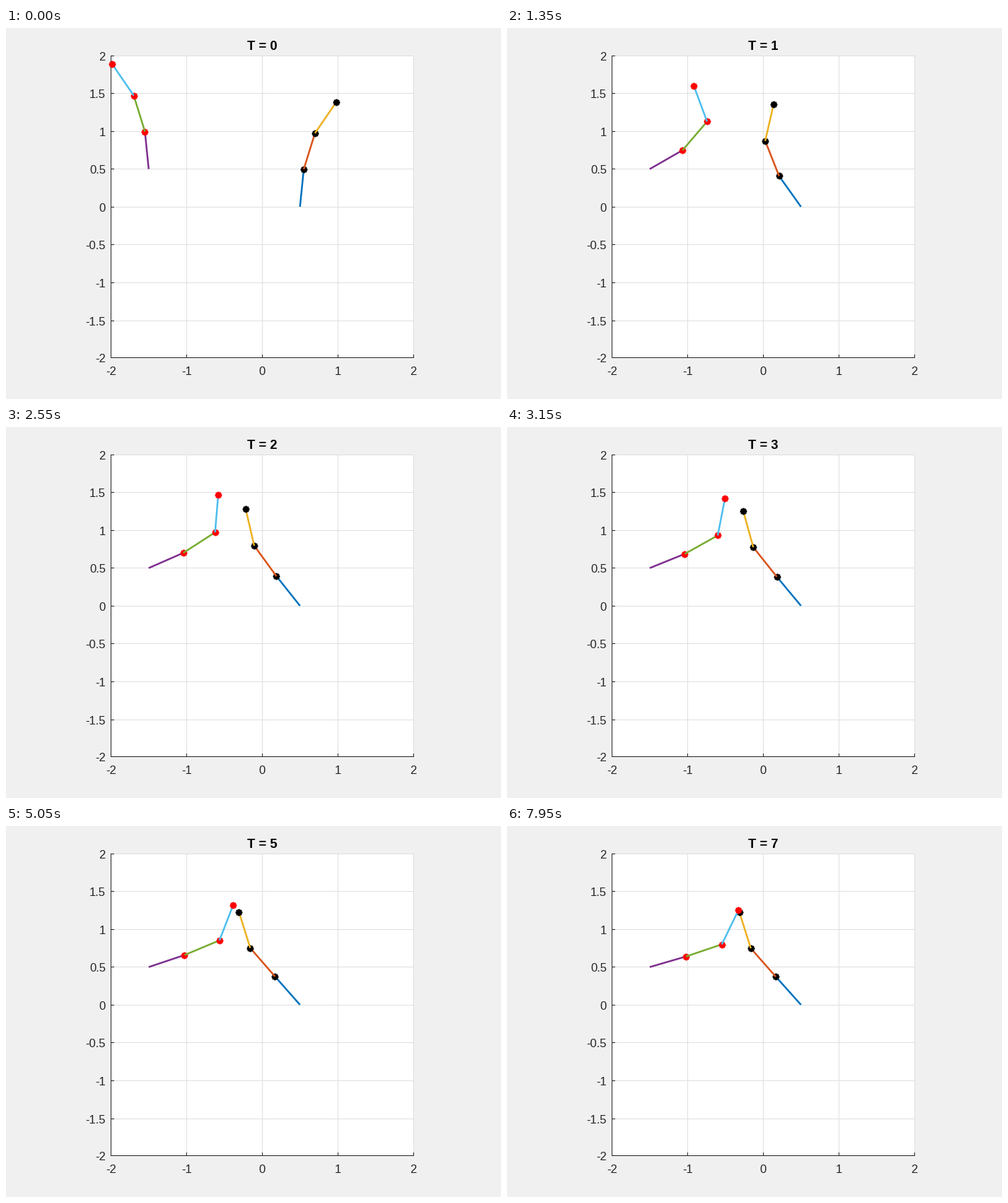
Animation, 700 px wide and 525 px high, one loop 8000 ms. Source, as a matplotlib script:

```python
import numpy as np
import matplotlib.pyplot as plt
from matplotlib.animation import FuncAnimation

W, H, DPI = 700, 525, 100
FRAMES, STEP = 160, 50
PX = 72 / DPI                       # points per pixel

LEFT, RIGHT, TOP, BOTTOM = 148.3, 576.2, 39.5, 466.5
LINK = 0.5
INK, GRID = "#262626", "#dfdfdf"
FONT = "Liberation Sans"
LEAN = np.cumsum([0.1, 0.2, 0.3])   # starting link angles from the vertical

# Per link: final angle, then size and rate of the slow decay,
# rate of the fast decay, and strength of the early swing.
ARMS = [
    dict(base=(0.5, 0), side=-1, marker="black",
         colors=("#0072bd", "#d95319", "#edb120"),
         links=[(0.73, 0.46, 0.8, 4.5, -12.15),
                (0.722, 1.167, 1.0, 3.5, 2.32),
                (0.305, 1.5, 1.2, 4.0, 28.9)]),
    dict(base=(-1.5, 0.5), side=1, marker="red",
         colors=("#7e2f8e", "#77ac30", "#4dbeee"),
         links=[(-1.31, 0.375, 0.35, 4.1, 0),
                (-1.28, 0.693, 0.37, 2.45, 0),
                (-0.475, 1.45, 0.52, 3.5, 7.37)]),
]


def to_px(x, y):
    return (LEFT + (x + 2) / 4 * (RIGHT - LEFT),
            BOTTOM - (y + 2) / 4 * (BOTTOM - TOP))


def angles(arm, t):
    """Settle from rest at the starting lean to the final angles."""
    end, slow, rate, fast, swing = np.array(arm["links"]).T
    rest = LEAN - arm["side"] * end - slow
    drift = rate * slow + fast * rest          # makes the start speed zero
    gap = (slow * np.exp(-rate * t)
           + (rest + drift * t + swing * t**2) * np.exp(-fast * t))
    return end + arm["side"] * gap


def joints(arm, t):
    q = angles(arm, t)
    x = arm["base"][0] - LINK * np.cumsum(np.r_[0, np.sin(q)])
    y = arm["base"][1] + LINK * np.cumsum(np.r_[0, np.cos(q)])
    return to_px(x, y)


fig = plt.figure(figsize=(W / DPI, H / DPI), dpi=DPI, facecolor="#f0f0f0")
ax = fig.add_axes([0, 0, 1, 1])
ax.set_xlim(0, W)
ax.set_ylim(H, 0)
ax.axis("off")


def rule(x, y, color):
    ax.plot(x, y, color=color, lw=PX, solid_capstyle="butt",
            snap=False, zorder=1)


def label(x, y, text, ha, size=16.67, color=INK, **kw):
    return ax.text(x, y, text, ha=ha, va="baseline", family=FONT,
                   fontsize=size * PX, color=color, **kw)


def draw_axes():
    x0, x1, y0, y1 = 148, 577, 39, 467
    left, bottom = x0 + 0.5, y1 - 0.5
    ax.add_patch(plt.Rectangle((x0, y0), x1 - x0, y1 - y0,
                               fc="white", ec="none", zorder=0))
    xs = [x0 + 107 * k + 0.5 for k in range(5)]
    ys = [min(np.floor(y0 + 53.58 * k) + 0.5, bottom) for k in range(9)]
    for x in xs:
        rule([x, x], [y0, y1], GRID)
    for y in ys:
        rule([x0, x1], [y, y], GRID)
    for k, x in enumerate(xs):
        rule([x, x], [bottom, bottom - 4.5], INK)
        label(to_px(k - 2, 0)[0], 491, f"{k - 2}", "center")
    for k, y in enumerate(ys):
        rule([left, left + 4.5], [y, y], INK)
        label(141, y + 6.5, f"{2 - k / 2:g}", "right")
    rule([left, left], [y0, y1], INK)
    rule([x0, x1], [bottom, bottom], INK)


draw_axes()
title = label(362.3, 31, "T = 0", "center", 18.33, "black", weight="bold")

# Each link is followed by its end marker, so the next link overlaps it.
parts = []
for arm in ARMS:
    pairs = []
    for color in arm["colors"]:
        link, = ax.plot([], [], color=color, lw=2.5 * PX,
                        solid_capstyle="butt", zorder=2)
        tip, = ax.plot([], [], ls="none", marker=(8, 2, 0), ms=9.4 * PX,
                       mew=2.4 * PX, color=arm["marker"], snap=False,
                       zorder=2)
        pairs.append((link, tip))
    parts.append(pairs)


def update(n):
    t = n * STEP / 1000
    title.set_text(f"T = {int(t)}")
    for arm, pairs in zip(ARMS, parts):
        x, y = joints(arm, t)
        for k, (link, tip) in enumerate(pairs):
            link.set_data(x[k:k + 2], y[k:k + 2])
            tip.set_data(x[k + 1:k + 2], y[k + 1:k + 2])
    return [title]


anim = FuncAnimation(fig, update, frames=FRAMES, interval=STEP,
                     repeat=True, repeat_delay=0, blit=False)
plt.show()
```
